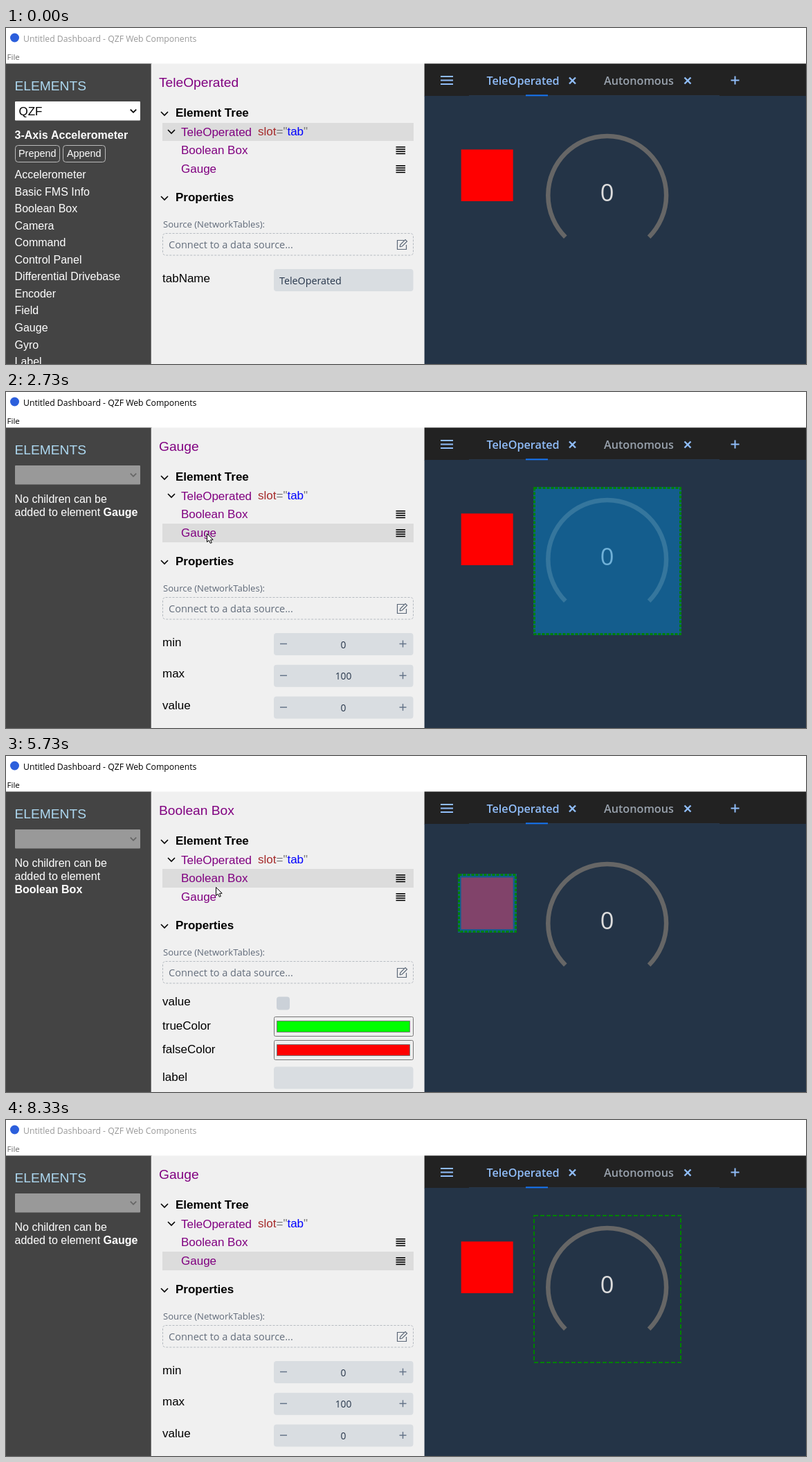
These frames come from a looping animation (1156 px wide and 485 px high, 8470 ms). An HTML page with a canvas:

```html
<!DOCTYPE html>
<html lang="en">
<head>
<meta charset="utf-8">
<title>Dashboard</title>
<style>
  html, body { margin: 0; width: 100%; height: 100%; overflow: hidden; background: #fff; }
  canvas { display: block; }
</style>
</head>
<body>
<canvas id="stage" width="1156" height="485"></canvas>
<script>
const ctx = document.getElementById('stage').getContext('2d');
const LOOP = 8470, TICKS_PER_MS = 0.015;
const ARIAL = '"Liberation Sans", Arial, sans-serif';
const SANS = '"Open Sans", "Noto Sans", sans-serif';
const PURPLE = '#800080', LIGHT_BLUE = '#90bdf9';
const PANEL_TOP = 51.4, TREE_LEFT = 209.7, BOARD_LEFT = 604.6;
const TREE = ['TeleOperated', 'Boolean Box', 'Gauge'];
const ROW_TOPS = [137, 163, 190, 217];
const ELEMENTS = ['Accelerometer', 'Basic FMS Info', 'Boolean Box', 'Camera', 'Command', 'Control Panel',
  'Differential Drivebase', 'Encoder', 'Field', 'Gauge', 'Gyro', 'Label'];

// [tick, x, y] for each stretch in which the pointer is visible
const POINTER_PATHS = [
  [[2, 1146, 470], [7, 451, 300], [10, 451, 300], [17, 350, 189], [23, 297, 178], [30, 297, 178],
   [36, 290, 204], [46, 290, 204], [55, 338, 138], [68, 338, 138], [73, 300, 176], [82, 300, 176],
   [86, 303, 189], [94, 290, 204], [105, 290, 204], [106, 300, 218], [107, 312, 221], [109, 390, 402]],
  [[116, 86, 470], [117, 80, 464], [119, 55, 476]]
];
// [tick, selected tree row]
const SELECTIONS = [[0, 0], [26, 1], [41, 2], [60, 0], [77, 1], [98, 2]];

function rect(x, y, w, h, color) {
  ctx.fillStyle = color;
  ctx.fillRect(x, y, w, h);
}

function box(x, y, w, h, radius, fill, border, dash = []) {
  ctx.beginPath();
  ctx.roundRect(x, y, w, h, radius);
  if (fill) { ctx.fillStyle = fill; ctx.fill(); }
  if (border) {
    ctx.setLineDash(dash);
    ctx.strokeStyle = border;
    ctx.lineWidth = 1;
    ctx.stroke();
    ctx.setLineDash([]);
  }
}

function text(str, x, y, size, color, weight = 400, family = ARIAL, align = 'left') {
  ctx.font = `${weight} ${size}px ${family}`;
  ctx.fillStyle = color;
  ctx.textAlign = align;
  ctx.fillText(str, x, y);
  return x + ctx.measureText(str).width;
}

function line(color, width, ...points) {
  ctx.beginPath();
  for (const [x, y] of points) ctx.lineTo(x, y);
  ctx.strokeStyle = color;
  ctx.lineWidth = width;
  ctx.stroke();
}

const chevron = (x, y, r = 5, color = '#000', width = 1.6) =>
  line(color, width, [x - r, y - r / 2], [x, y + r / 2], [x + r, y - r / 2]);

function plus(x, y, r, color, width) {
  line(color, width, [x - r, y], [x + r, y]);
  line(color, width, [x, y - r], [x, y + r]);
}

function cross(x, y) {
  const r = 4.5;
  line(LIGHT_BLUE, 2.4, [x - r, y - r], [x + r, y + r]);
  line(LIGHT_BLUE, 2.4, [x + r, y - r], [x - r, y + r]);
}

function pointerAt(tick) {
  for (const path of POINTER_PATHS) {
    for (let i = 1; i < path.length; i++) {
      const [t0, x0, y0] = path[i - 1], [t1, x1, y1] = path[i];
      if (tick >= t0 && tick <= t1) {
        const p = (tick - t0) / (t1 - t0);
        return { x: x0 + (x1 - x0) * p, y: y0 + (y1 - y0) * p };
      }
    }
  }
  return null;
}

// Hover feedback trails the pointer by one tick.
function hoveredRow(tick) {
  const p = pointerAt(tick - 1);
  if (!p || p.x < 226 || p.x > 589) return -1;
  return TREE.findIndex((_, i) => p.y >= ROW_TOPS[i] && p.y < ROW_TOPS[i + 1]);
}

function drawTitleBar(tick) {
  rect(0, 0, 1156, 60, '#fff');
  ctx.fillStyle = '#2c5fdc';
  ctx.beginPath();
  ctx.arc(12.5, 14, 6.5, 0, Math.PI * 2);
  ctx.fill();
  const active = last => tick >= 24 && tick < last;
  text('Untitled Dashboard - QZF Web Components', 25, 19.5, 12.25, active(124) ? '#000' : '#999', 400, SANS);
  text('File', 1.5, 45.5, 11.6, active(125) ? '#000' : '#6d6d6d', 400, SANS);
}

function drawElements(selected) {
  rect(0, PANEL_TOP, 211, 434, '#444');
  text('ELEMENTS', 12.5, 89.5, 19.2, '#add8f0');
  const enabled = selected === 0;
  box(13, 106, 181, 27.5, 1, enabled ? '#fff' : '#999');
  chevron(184, 119.7, 4.2, enabled ? '#000' : '#666', 1.8);
  if (!enabled) {
    text('No children can be', 12.5, 159.5, 16, '#fff');
    const end = text('added to element ', 12.5, 178.5, 16, '#fff');
    const [x, y] = selected === 1 ? [12.5, 198] : [end, 178.5];
    text(TREE[selected], x, y, 16, '#fff', 700);
    return;
  }
  text('QZF', 18.5, 126, 17, '#000');
  text('3-Axis Accelerometer', 12.5, 159.5, 16, '#fff', 700);
  box(13.5, 169.5, 64, 24, 4, null, '#bbb');
  text('Prepend', 18, 186, 14.4, '#fff');
  box(82.5, 169.5, 61, 24, 4, null, '#bbb');
  text('Append', 88, 186, 14.4, '#fff');
  ELEMENTS.forEach((name, i) => text(name, 12.5, 217 + i * 24.55, 16, '#fff'));
}

function drawTree(selected, hovered) {
  rect(TREE_LEFT, PANEL_TOP, 396, 434, '#f0f0f0');
  text(TREE[selected], 221, 84.5, 19.2, PURPLE);
  chevron(229, 123.5);
  text('Element Tree', 245, 128, 17, '#000', 700);
  TREE.forEach((name, i) => {
    const top = ROW_TOPS[i];
    if (i === selected || i === hovered)
      rect(226, top, 363, ROW_TOPS[i + 1] - top, i === selected ? '#dcdcdc' : '#e8f0f9');
    text(name, 253, top + 18.5, 17, PURPLE);
    if (i) for (let k = 0; k < 4; k++) rect(563.5, top + 8 + k * 3.2, 13.5, 1.6, '#000');
  });
  chevron(239, 149.5);
  let x = 364;
  for (const [part, color] of [['slot', 'brown'], ['="', '#777'], ['tab', '#00f'], ['"', '#777']])
    x = text(part, x, 155, 17, color);
}

function drawEditIcon() {
  const color = '#5c6878';
  line(color, 1.2, [575, 306.5], [565.5, 306.5], [565.5, 319.5], [578.5, 319.5], [578.5, 313]);
  line(color, 1.2, [569, 316], [570, 312.5], [577, 305.5], [579.5, 308], [572.5, 315], [569, 316]);
}

const field = y => box(387, y, 201.5, 32, 4, '#d9dde1');

function drawProperties(selected) {
  const label = (str, y) => text(str, 226, y, 17, '#000');
  chevron(229, 245.5);
  text('Properties', 245, 250, 17, '#000', 700);
  text('Source (NetworkTables):', 227, 288, 13.1, '#5f6978', 500, SANS);
  box(226.5, 296.5, 362, 31.5, 4, null, '#b5bac0', [3, 2]);
  text('Connect to a data source...', 235, 318, 14.5, '#636d7b', 500, SANS);
  drawEditIcon();

  if (selected === 0) {
    label('tabName', 366.5);
    field(348);
    text('TeleOperated', 395, 369.5, 14.3, '#26354a', 500, SANS);
  } else if (selected === 1) {
    label('value', 360);
    box(391, 347.5, 19, 19, 4, '#cbd1d8');
    [['trueColor', '#0f0'], ['falseColor', '#f00']].forEach(([name, color], i) => {
      const y = 376.5 + i * 34;
      label(name, y + 18);
      box(387.5, y, 201, 28, 2, '#efefef', '#767676');
      box(391.5, y + 6, 192, 16, 0, color, '#777');
    });
    label('label', 468.5);
    field(448.5);
  } else {
    [['min', 0], ['max', 100], ['value', 0]].forEach(([name, value], i) => {
      const y = 348 + i * 45.8;
      label(name, y + 18.5);
      field(y);
      line('#66758a', 1.5, [396, y + 15.5], [406, y + 15.5]);
      plus(573.5, y + 15.5, 5, '#66758a', 1.5);
      text(value, 487.5, y + 21.5, 13.8, '#26354a', 500, SANS, 'center');
    });
  }
}

function drawFrame(x, y, size, isSelected, isHovered) {
  if (isHovered) rect(x, y, size, size, 'rgba(5, 133, 211, 0.5)');
  if (!isSelected) return;
  const width = isHovered ? 3 : 2;
  ctx.setLineDash(isHovered ? [4, 2] : [6, 3]);
  ctx.strokeStyle = '#008000';
  ctx.lineWidth = width;
  ctx.strokeRect(x + width / 2, y + width / 2, size - width, size - width);
  ctx.setLineDash([]);
}

function drawDashboard(selected, hovered) {
  rect(BOARD_LEFT, PANEL_TOP, 552, 47, '#222');
  rect(BOARD_LEFT, 98, 552, 387, '#243447');
  for (const y of [69, 74.5, 80]) rect(628, y, 18, 2, LIGHT_BLUE);
  rect(669, 97, 362, 1, '#283648');
  rect(751, 96.3, 32, 2, '#1676f3');
  text('TeleOperated', 694.5, 81.5, 16.2, LIGHT_BLUE, 600, SANS);
  text('Autonomous', 864, 81.5, 16.2, '#99a2ad', 600, SANS);
  cross(818.5, 76);
  cross(985, 76);
  plus(1053.5, 75.5, 6, LIGHT_BLUE, 2);

  rect(657.7, 175.4, 75, 74.6, '#f00');
  ctx.beginPath();
  ctx.arc(868.7, 241.4, 85.4, Math.PI * 0.75, Math.PI * 2.25);
  ctx.strokeStyle = '#666';
  ctx.lineWidth = 6.5;
  ctx.stroke();
  text('0', 868.5, 250, 34.5, '#ddd', 400, SANS, 'center');

  drawFrame(653, 170, 85, selected === 1, hovered === 1);
  drawFrame(762, 137, 214, selected === 2, hovered === 2);
}

function drawPointer({ x, y }) {
  ctx.save();
  ctx.translate(Math.round(x) + 0.5, Math.round(y) + 0.5);
  ctx.beginPath();
  for (const [px, py] of [[0, 0], [0, 12], [2.8, 9.6], [4.8, 13.8], [6.8, 13], [5, 8.9], [8.7, 8.7]])
    ctx.lineTo(px, py);
  ctx.closePath();
  ctx.fillStyle = '#fff';
  ctx.fill();
  ctx.strokeStyle = '#000';
  ctx.lineWidth = 1;
  ctx.stroke();
  ctx.restore();
}

function draw() {
  const tick = Math.floor((performance.now() % LOOP) * TICKS_PER_MS + 0.1);
  const selected = SELECTIONS.findLast(([start]) => start <= tick)[1];
  const hovered = hoveredRow(tick);
  drawTitleBar(tick);
  drawElements(selected);
  drawTree(selected, hovered);
  drawProperties(selected);
  drawDashboard(selected, hovered);
  const pointer = pointerAt(tick);
  if (pointer) drawPointer(pointer);
  requestAnimationFrame(draw);
}
draw();
</script>
</body>
</html>
```
